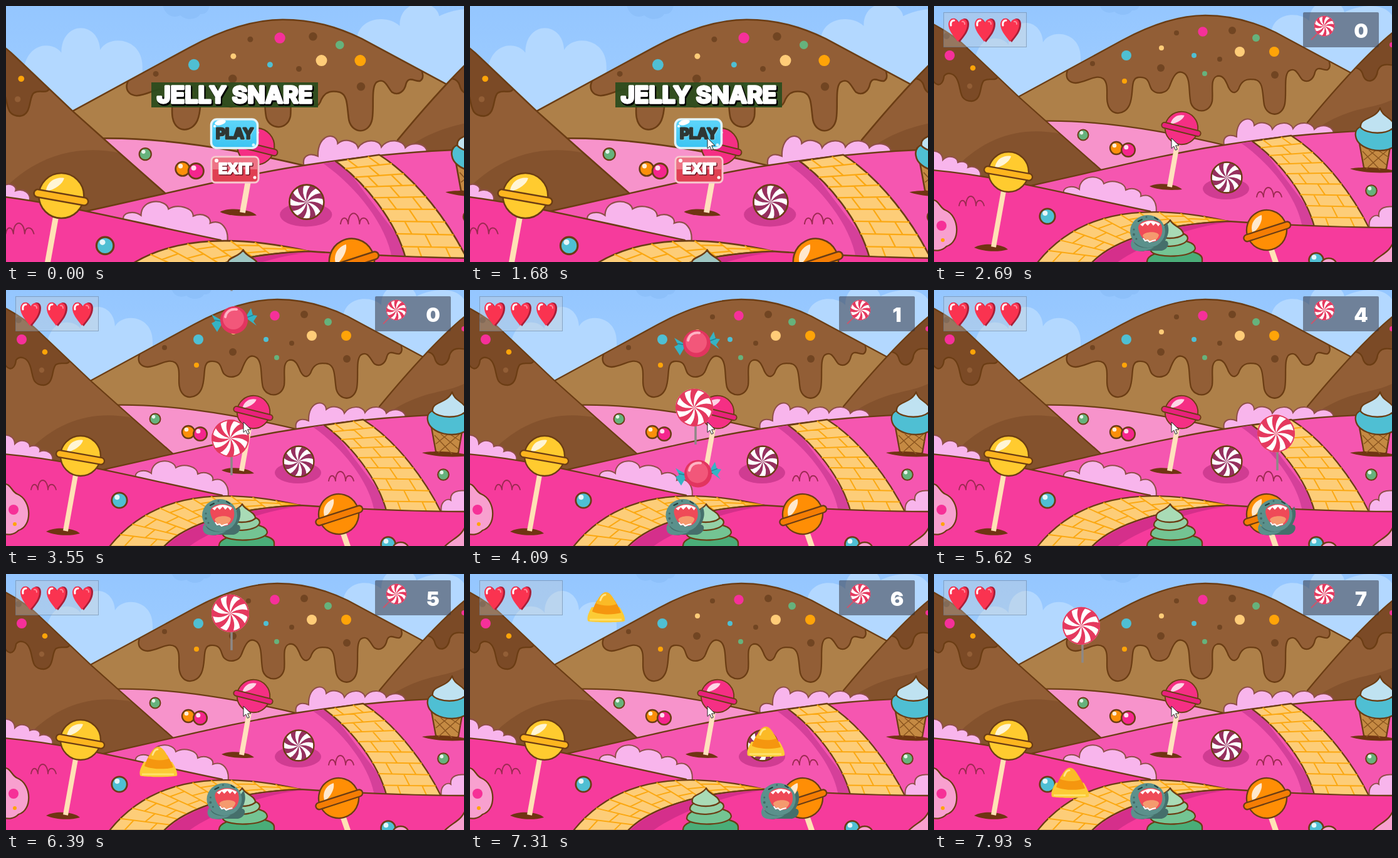
Recreate the animation shown at these times as an HTML page. Size 731 by 409 pixels, loop 8000 ms.

```html
<!DOCTYPE html>
<html lang="en">
<head>
<meta charset="utf-8">
<title>Jelly Snare</title>
<style>
html, body { margin: 0; width: 100%; height: 100%; overflow: hidden; background: #9accff; }
svg { display: block; width: 100%; height: 100%; }
text { font-family: Inter, Roboto, "DejaVu Sans", sans-serif; font-weight: 700; text-anchor: middle; stroke-linejoin: round; }
#score { font-weight: 900; }
.o { stroke: #6b3d14; stroke-width: 2.3; stroke-linejoin: round; stroke-linecap: round; }
.line { fill: none; }
.bush { fill: #f8b5ec; stroke: #8f4f48; stroke-width: 2; }
.brick { fill: none; stroke: #fba812; stroke-width: 2; }
.tuft { fill: none; stroke: #9c2a52; stroke-width: 1.8; stroke-linecap: round; }
.tip { fill: #9ec6c2; }
.playing .tip { fill: #a9dbb6; }
.playing #menu, svg:not(.playing) #game { display: none; }
</style>
</head>
<body>
<svg id="stage" viewBox="0 0 731 409" preserveAspectRatio="none">
<defs>
  <linearGradient id="sky" x2="0" y2="1"><stop stop-color="#94c6ff"/><stop offset="1" stop-color="#a6d1ff"/></linearGradient>
  <linearGradient id="blue" x2="0" y2="1"><stop stop-color="#5fd6fa"/><stop offset="1" stop-color="#3cc4f2"/></linearGradient>
  <path id="hill" d="M133 146L300 55C350 28 395 15 433 15C475 15 510 25 545 42L664 106L740 160V260H128Z"/>
  <path id="left" d="M-5 27C20 40 40 54 55 69L134 144L200 203L268 263L150 310H-5Z"/>
  <path id="right" d="M596 186C630 145 690 75 740 36V215H596Z"/>
  <clipPath id="inHill"><use href="#hill"/></clipPath>
  <clipPath id="inLeft"><use href="#left"/></clipPath>
  <clipPath id="inRight"><use href="#right"/></clipPath>

  <path id="petal" d="M0 0Q4-18 18-24A30 30 0 0 1 25.8-15.3Q10.6-15.1 0 0Z" fill="currentColor"/>
  <g id="half">
    <use href="#petal"/><use href="#petal" transform="rotate(45)"/>
    <use href="#petal" transform="rotate(90)"/><use href="#petal" transform="rotate(135)"/>
  </g>
  <g id="swirl">
    <circle r="30" fill="#fff"/>
    <use href="#half"/><use href="#half" transform="rotate(180)"/>
    <circle r="29" fill="none" stroke="currentColor" stroke-width="2"/>
  </g>
  <g id="pop">
    <circle class="o" r="32" style="fill:var(--c)"/>
    <path d="M-22-6C-20-22-6-27 4-25C2-17-8-9-22-6Z" fill="#fff" opacity=".8"/>
    <rect class="o" x="-39" y="-3" width="78" height="11" rx="5.5" transform="rotate(10)" style="fill:var(--b)"/>
  </g>
  <g id="bead">
    <circle class="o" r="10" stroke-width="2" style="fill:var(--c)"/>
    <circle cx="-3" cy="-4" r="3.3" fill="#fff" opacity=".85"/>
  </g>
  <path id="tuft" class="tuft" d="M-20 8C-18-3-11-3-9 8M-9 8C-9-12 6-12 7 8M7 8C8-3 17-3 20 8"/>

  <g id="lolly" color="#e5395f">
    <path d="M2 28V59" stroke="#8d8886" stroke-width="3.5"/>
    <use href="#swirl"/>
  </g>
  <g id="corn">
    <path d="M-29 22C-31 15-27 8-23 0H22C27 8 31 16 30 22C28 25-27 25-29 22Z" fill="#fccb35"/>
    <path d="M-22 7C-20 0-16-8-14-11H14C17-6 22 2 24 9C10 13-10 12-22 7Z" fill="#f5960f"/>
    <path d="M-16-6C-12-16-6-24 0-24C8-24 13-12 17-5C6-1-6-2-16-6Z" fill="#fbba26"/>
    <path d="M-9-11C-7-17-4-20-1-20" stroke="#ffe58a" stroke-width="3" fill="none" stroke-linecap="round"/>
    <path d="M-26 20H25" stroke="#ffe16b" stroke-width="3"/>
  </g>
  <g id="candy">
    <path d="M-17 2L-36-9L-30 2L-36 5L-27 19ZM18-4L27-19L30-8L37-7L31 2L36 9Z" fill="#35b3c4"/>
    <path d="M-20 2L-31 0M20-4L31-8" stroke="#1d8496" stroke-width="1.5"/>
    <circle r="22" fill="#e2355f"/>
    <circle cx="-1" cy="-2" r="17" fill="#f2577a"/>
    <path d="M-14-5C-12-15-4-18 4-17" stroke="#ffb3c4" stroke-width="4" fill="none" stroke-linecap="round"/>
  </g>
  <g id="heart">
    <path d="M2 20C-8 8-15 1-15-9C-15-20-4-22 1-11C6-21 17-20 17-9C17 2 10 10 2 20Z" fill="#a81f38"/>
    <path d="M-1 19C-9 8-16 1-16-9C-15-20-4-21 0-11C4-20 14-19 14-9C14 1 7 10-1 19Z" fill="#fa3350"/>
    <path d="M-12-7C-13-13-10-15-7-15" stroke="#fff" stroke-width="3" fill="none" stroke-linecap="round"/>
    <path d="M6-13C9-14 10-11 10-9" stroke="#ff8a9a" stroke-width="2" fill="none" stroke-linecap="round"/>
  </g>
</defs>

<g id="land">
  <rect y="-10" width="731" height="260" fill="url(#sky)"/>
  <path d="M262-10C264 8 276 14 288 9C296 17 312 15 316 7C326 8 329 0 330-10Z" fill="#8dc0fa"/>
  <path d="M68 130C50 45 105 42 119 62C119 16 172 16 174 58C186 36 234 40 234 82V160H68Z" fill="#b3d8ff"/>
  <path d="M538 52C534 12 580 6 599 24C598-16 650-16 655 10C675 0 715-8 731 15V120H560C540 100 532 70 538 52Z" fill="#b3d8ff"/>

  <use href="#hill" fill="#ae8049"/>
  <g clip-path="url(#inHill)">
    <path class="o" fill="#925e36" d="M228 88C205 102 208 122 226 123C244 122 258 108 270 116C280 124 274 145 277 155C281 176 304 176 312 158C320 140 312 116 326 114C346 112 342 128 348 134C356 142 372 140 376 128C382 112 388 100 400 108C410 116 406 140 410 155C416 172 440 172 444 152C446 136 440 116 452 112C462 110 466 120 470 130C476 142 484 140 488 128C494 116 504 116 514 118C526 122 524 140 527 158C532 178 556 178 560 156C563 138 558 112 566 104C578 96 582 112 588 118C598 124 606 116 608 106C612 94 622 104 628 102C634 98 632 92 628 80V-20H228Z"/>
  </g>
  <use href="#hill" class="o line"/>
  <g fill="#714522">
    <circle cx="387" cy="43" r="4"/><circle cx="476" cy="39" r="6"/><circle cx="456" cy="85" r="4"/>
    <circle cx="362" cy="99" r="6"/><circle cx="253" cy="92" r="4"/><circle cx="544" cy="110" r="6"/>
  </g>
  <g fill="#f6309a"><circle cx="429" cy="41" r="7.7"/></g>
  <g fill="#66b27c"><circle cx="514" cy="51" r="6"/><circle cx="432" cy="108" r="4"/></g>
  <g fill="#4fbfd3"><circle cx="307" cy="79" r="8"/><circle cx="415" cy="79" r="4"/></g>
  <g fill="#ffcc78"><circle cx="488" cy="73" r="8"/><circle cx="363" cy="67" r="4"/></g>
  <g fill="#ffa408"><circle cx="543" cy="73" r="8"/><circle cx="304" cy="120" r="4"/></g>

  <use href="#right" fill="#925e36"/>
  <g clip-path="url(#inRight)">
    <path d="M620 190C670 160 700 165 731 150V215H600Z" fill="#84522d"/>
    <path class="o" fill="#7b4a26" d="M655 100C668 98 680 96 684 108C688 126 706 122 708 104C712 92 722 92 740 96V20H655Z"/>
    <circle cx="731" cy="62" r="4" fill="#f6309a"/>
  </g>
  <use href="#right" class="o line"/>

  <path class="o" fill="#f793cb" d="M160 184C240 181 340 192 475 225V300H160Z"/>
  <use href="#left" fill="#925e36"/>
  <g clip-path="url(#inLeft)">
    <path d="M10 290C60 215 130 190 200 204L280 270L150 310Z" fill="#84522d"/>
    <path class="o" fill="#7b4a26" d="M-6 105C-2 130 14 132 16 112C22 104 34 108 38 120C44 135 40 152 60 152C78 150 72 125 80 119C90 113 100 124 104 108V-10H-6Z"/>
    <circle cx="25" cy="79" r="8" fill="#f6309a"/><circle cx="62" cy="99" r="4.3" fill="#ffa408"/>
    <circle cx="57" cy="128" r="4.2" fill="#925e36"/><circle cx="20" cy="48" r="5" fill="#5f3819"/>
  </g>
  <use href="#left" class="o line"/>

  <path class="bush" d="M463 222C460 207 472 204 483 209C482 176 510 174 511 191C522 182 538 188 540 197C548 184 570 184 573 196C582 183 604 185 607 197C618 186 642 192 637 207L600 225Z"/>
  <path class="o" fill="#f556b0" d="M150 288C260 264 380 234 470 221C560 207 640 200 740 198V420H150Z"/>
  <path d="M490 219C535 250 580 305 588 354H620L515 215Z" fill="#d5409a"/>
  <path class="o" fill="#fdcd78" d="M508 216C548 245 594 300 608 356H695C670 305 625 242 570 207Z"/>
  <path class="brick" id="lane"/>

  <use href="#bead" transform="translate(238 206) scale(.85)" style="--c:#66b27c"/>
  <use href="#bead" transform="translate(291 227)" style="--c:#fb8f0a"/>
  <use href="#bead" transform="translate(310 230) scale(1.08)" style="--c:#f5258d"/>
  <use href="#bead" transform="translate(698 295) scale(.88)" style="--c:#66b27c"/>
  <path d="M344 288C356 281 388 284 396 293C380 295 356 294 344 288Z" fill="#703412"/>
  <path d="M388 222L376 289" stroke="#ffe1bd" stroke-width="8"/>
  <use href="#pop" transform="translate(395 195) rotate(4) scale(.82)" style="--c:#f52f84;--b:#e8217c"/>
  <ellipse cx="466" cy="292" rx="37" ry="17" fill="#d03c92"/>
  <use href="#swirl" transform="translate(467 274) rotate(22.5) scale(.83)" color="#96305f"/>
  <circle class="o line" cx="467" cy="274" r="24.5"/>
  <use href="#tuft" transform="translate(535 297)"/>

  <path class="o" fill="#c58a43" d="M678 214L686 258C698 265 714 265 722 260L730 214Z"/>
  <path d="M664 260C680 256 725 258 740 265C710 268 680 266 664 260Z" fill="#703412"/>
  <path d="M684 232L712 262M694 230L722 254M708 230L726 242M724 230L690 260M708 228L686 246" stroke="#8b551f" stroke-width="1.5"/>
  <path class="o" fill="#4fbfd3" d="M673 208C670 190 690 190 706 190C742 190 740 215 735 224C718 238 676 230 673 208Z"/>
  <path class="o" fill="#bfe2f1" d="M681 194C678 178 704 182 712 163C716 178 732 178 735 192C725 207 690 205 681 194Z"/>
  <path class="bush" d="M695 355C692 338 704 332 710 336C708 322 722 318 740 322V356Z"/>
  <path class="bush" d="M207 300C204 288 222 286 232 293C232 268 268 269 271 284C284 276 306 282 306 294C320 288 332 296 330 304C346 298 358 312 354 334Z"/>
  <path class="bush" d="M-5 232C8 230 14 238 14 246C24 236 38 242 38 250C48 246 56 252 54 258C66 254 76 262 74 272L-5 280Z"/>
  <path class="o" fill="#f63b9c" d="M-5 262C100 271 200 298 345 328L400 420H-5Z"/>
  <path class="o" fill="#fdcd78" d="M165 410C225 335 320 310 470 344C365 348 285 375 252 410Z"/>
  <path class="brick" id="bend"/>
  <path class="o" fill="#f63b9c" d="M252 410C285 375 365 348 470 344C560 350 650 354 740 354V420H252Z"/>
  <path d="M255 410C288 376 367 349 468 346C410 352 330 382 292 410Z" fill="#d52f8b"/>

  <g class="o">
    <path fill="#4aad78" d="M340 409C338 386 428 384 428 404V420H340Z"/>
    <path fill="#74c493" d="M346 391C344 370 416 368 417 387C416 402 352 404 346 391Z"/>
    <path fill="#93d0a6" d="M351 376C350 358 404 356 405 371C404 386 356 388 351 376Z"/>
    <path class="tip" d="M355 365C352 351 370 354 377 342C381 352 398 354 398 365C388 373 364 373 355 365Z"/>
  </g>
  <path d="M64 386C80 377 110 381 118 389C100 394 78 392 64 386Z" fill="#703412"/>
  <path d="M111 296L95 385" stroke="#ffe1b5" stroke-width="8"/>
  <use href="#pop" transform="translate(119 265)" style="--c:#ffcb2f;--b:#fdb51f"/>
  <path d="M538 388L549 420" stroke="#ffe1b5" stroke-width="9"/>
  <use href="#pop" transform="translate(531 358) rotate(-28)" style="--c:#ff8e05;--b:#f47d04"/>
  <use href="#bead" transform="translate(181 336) scale(1.22)" style="--c:#4fbfd3"/>
  <use href="#bead" transform="translate(610 406) scale(1.15)" style="--c:#4fbfd3"/>
  <use href="#tuft" transform="translate(60 311)"/>
  <path class="o" fill="#f8a0cf" d="M-5 310C8 308 8 322 18 326C42 336 42 378 20 384C12 392 4 391-5 390Z"/>
  <circle cx="12" cy="351" r="8" fill="#f63097"/><circle cx="14" cy="374" r="3" fill="#ffa408"/>
  <path class="o" fill="#f8a0cf" d="M698 412C712 396 728 396 735 372V412ZM617 412C622 400 638 400 643 412Z"/>
</g>

<g id="menu">
  <rect x="232" y="122" width="266" height="40" fill="#2b4c1e" opacity=".93"/>
  <g font-size="37.5">
    <text x="366.500" y="156.500" stroke="#000" stroke-width="5">JELLY SNARE</text>
    <text x="365" y="155" fill="#fff" stroke="#fff" stroke-width="3.6">JELLY SNARE</text>
  </g>
  <rect x="327.500" y="181" width="74" height="46" rx="9" fill="url(#blue)" stroke="#e3f3f8" stroke-width="3.500"/>
  <ellipse cx="342" cy="186" rx="9" ry="4" fill="#fff" transform="rotate(-14 342 186)"/>
  <circle cx="333" cy="192" r="2" fill="#fff"/><circle cx="395" cy="222" r="2.500" fill="#d5f5ff"/>
  <g font-size="23">
    <text x="366" y="213" fill="#8fd7e4" stroke="#8fd7e4" stroke-width="2.500">PLAY</text>
    <text x="365" y="212" fill="#2f3734" stroke="#2f3734" stroke-width="3">PLAY</text>
  </g>
  <rect x="328" y="241" width="75" height="41" rx="6" fill="#e04052" stroke="#f6c9cf" stroke-width="3"/>
  <path d="M330 246Q330 243 334 243H398Q401 243 401 246V261H330Z" fill="#ee7385"/>
  <circle cx="336" cy="247" r="3" fill="#fff"/><circle cx="397" cy="274" r="2.500" fill="#fff"/>
  <g font-size="23.500">
    <text x="367" y="268.500" fill="#6b1420" stroke="#6b1420" stroke-width="3.500">EXIT</text>
    <text x="366" y="267.500" fill="#fff" stroke="#fff" stroke-width="2.500">EXIT</text>
  </g>
</g>

<g id="game">
  <g id="items"></g>
  <g id="hero">
    <path d="M-22 12C-32 26-14 31-6 28H20C32 26 34 12 26 12C30 4 34-4 29-17C22-10 22-2 18 8Z" fill="#456f6b"/>
    <ellipse cx="-2" cy="-3" rx="28" ry="26" fill="#5b918c"/>
    <path d="M-26 10C-22 24-6 25 8 22C2 28-22 32-27 24C-30 19-29 14-26 10Z" fill="#5b918c"/>
    <path d="M-17-8C-18-24 20-26 21-9C23 4 15 15 3 14C-8 14-15 4-17-8Z" fill="#ef4a58"/>
    <path d="M-10 4C-8-3 14-4 16 3C12 16-4 17-10 4Z" fill="#f59a6e"/>
    <path d="M-14-14Q2-25 18-15L15-11L11-16L7-12L3-17L-2-12L-6-16L-10-11Z" fill="#fff"/>
    <path d="M-9 8L-6 12L-2 11L1 14L6 12L11 11" stroke="#fff" stroke-width="2" fill="none"/>
    <path d="M-17-19L-11-22M9-25L14-22" stroke="#243d3b" stroke-width="2" stroke-linecap="round"/>
    <g fill="#416a66"><circle cx="-24" cy="2" r="2"/><circle cx="-20" cy="9" r="1.500"/><circle cx="-24" cy="-6" r="1.500"/><circle cx="-4" cy="-26" r="1.500"/></g>
  </g>
  <rect x="15.500" y="10.500" width="132" height="55" fill="#c8ccd0" fill-opacity=".34" stroke="#667f99" stroke-opacity=".55"/>
  <g id="hearts">
    <use href="#heart" x="39" y="38"/><use href="#heart" x="81" y="38"/><use href="#heart" x="122" y="38"/>
  </g>
  <rect x="589" y="10" width="121" height="56" rx="2" fill="#32323c" opacity=".52"/>
  <path d="M613 43L602 54" stroke="#c9566d" stroke-width="2"/>
  <use href="#swirl" transform="translate(623 32) scale(.54)" color="#e5395f"/>
  <text id="score" x="681.500" y="51" font-size="32" fill="#fff"></text>
</g>

<path id="cursor" d="M0 0V16.500L3.800 13L6.500 19.300L9.300 18L6.600 12H12Z" fill="#fff" stroke="#222" stroke-width="1"/>
</svg>
<script>
const LOOP = 8000, START = 2460, STEP = 77.04, SPEED = 0.455;
const CATCH_Y = 339, MISS_Y = 436;
const $ = id => document.getElementById(id);
const show = (el, on) => el.style.display = on ? '' : 'none';
const place = (el, x, y) => el.setAttribute('transform', `translate(${x.toFixed(1)} ${y.toFixed(1)})`);
const mix = (a, b, p) => a + (b - a) * p;

// point on a cubic curve given as x0 y0 x1 y1 x2 y2 x3 y3
function bezier(c, t) {
  const u = 1 - t, w = [u * u * u, 3 * u * u * t, 3 * u * t * t, t * t * t];
  return [0, 1].map(k => w.reduce((sum, v, i) => sum + v * c[2 * i + k], 0));
}

// rows across a road between two edges, with staggered joints
function pave(el, a, b, rows) {
  const at = (row, p) => {
    const l = bezier(a, row / rows), r = bezier(b, row / rows);
    return [0, 1].map(k => mix(l[k], r[k], p).toFixed(1)).join(' ');
  };
  let d = '';
  for (let i = 0; i < rows; i++) {
    if (i) d += `M${at(i, 0)}L${at(i, 1)}`;
    for (const p of i % 2 ? [0.5] : [0.27, 0.74]) d += `M${at(i, p)}L${at(i + 1, p)}`;
  }
  el.setAttribute('d', d);
}
pave($('lane'), [508, 216, 548, 245, 594, 300, 608, 356], [570, 207, 625, 242, 670, 305, 695, 356], 9);
pave($('bend'), [165, 410, 225, 335, 320, 310, 470, 344], [252, 410, 285, 375, 365, 348, 470, 344], 11);

// kind, x, time at the top edge, caught
const drops = [
  ['lolly', 358, 3018, 1], ['candy', 364, 3433, 1], ['lolly', 358, 3665, 1],
  ['candy', 362, 3890, 1], ['lolly', 546, 5115, 1], ['corn', 243, 5730, 0],
  ['lolly', 358, 6251, 1], ['corn', 472, 6725, 1], ['corn', 217, 7197, 0],
  ['lolly', 235, 7748, 0]
].map(([kind, x, t0, caught]) => {
  const el = document.createElementNS('http://www.w3.org/2000/svg', 'use');
  el.setAttribute('href', '#' + kind);
  $('items').append(el);
  return { el, x, t0, caught };
});

// time, x
const walk = [
  [2460, 343], [3550, 343], [3900, 346], [4250, 339], [4700, 355], [5010, 355],
  [5600, 546], [5900, 546], [6390, 350], [6700, 350], [7010, 358],
  [7310, 493], [7390, 512], [7470, 516], [7930, 343]
];

function along(path, t) {
  const i = path.findIndex(k => k[0] >= t);
  if (i < 0) return path[path.length - 1][1];
  if (i === 0) return path[0][1];
  const [a, b] = [path[i - 1], path[i]];
  return mix(a[1], b[1], (t - a[0]) / (b[0] - a[0]));
}

function pointer(t) {
  if (t >= 1680) return [379, 211];
  if (t >= 1450) return [382, 215];
  const s = 290 + Math.floor((t - 290) / 78) * 78;
  if (s <= 1070) {
    const p = (s - 290) / 780, e = 1 - (1 - p) ** 1.6;
    return [mix(637, 406, e), mix(394, 211, e)];
  }
  const p = Math.min(1, (s - 1070) / 230);
  return [mix(406, 386, p), mix(211, 215, p)];
}

function play(t) {
  const now = START + Math.floor((t - START + 5) / STEP) * STEP;
  let score = 0, lives = 3;
  for (const d of drops) {
    const y = (now - d.t0) * SPEED;
    const got = d.caught && y >= CATCH_Y;
    const missed = y >= MISS_Y;
    if (got) score++;
    else if (missed) lives--;
    show(d.el, y > -65 && !got && !missed);
    place(d.el, d.x, y);
  }
  place($('hero'), along(walk, now), 363);
  [...$('hearts').children].forEach((h, i) => show(h, i < lives));
  $('score').textContent = score;
}

function draw(t) {
  const inGame = t >= START;
  $('stage').classList.toggle('playing', inGame);
  $('land').setAttribute('transform', inGame ? '' : 'translate(-45.5 4.9) scale(1.125)');
  show($('cursor'), t >= 290);
  place($('cursor'), ...pointer(t));
  if (inGame) play(t);
}

const begin = performance.now();
function tick() {
  draw((performance.now() - begin) % LOOP);
  requestAnimationFrame(tick);
}
tick();
</script>
</body>
</html>
```
